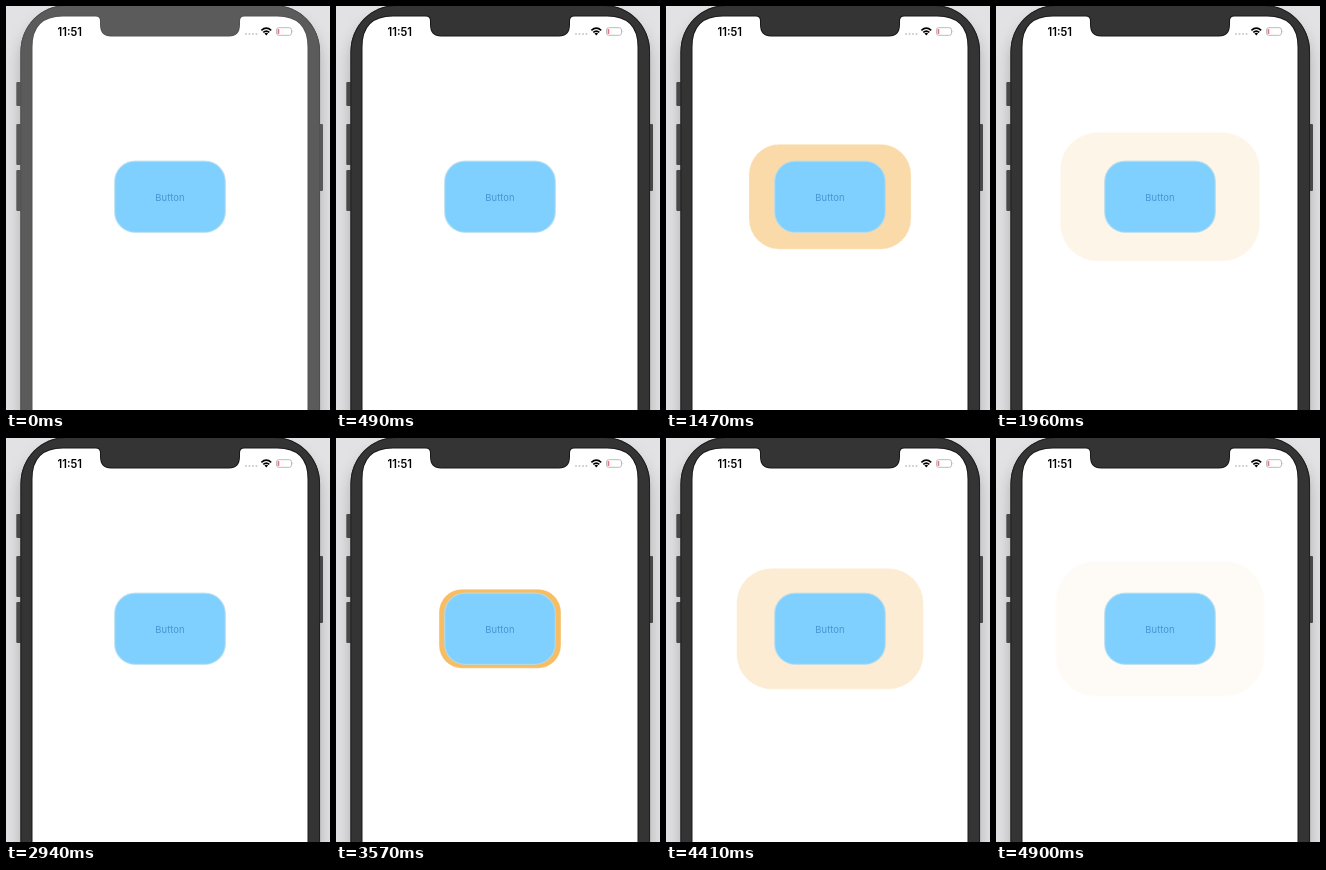
Recreate the animation shown at these times as an HTML page. Size 324 px wide and 404 px high, loop 4970 ms.

```html
<!DOCTYPE html>
<html lang="en">
<head>
<meta charset="utf-8">
<title>Pulsing button</title>
<style>
  html, body { margin: 0; width: 100%; height: 100%; overflow: hidden; background: #e2e2e5; }
  svg { display: block; width: 324px; height: 404px; }
  text { font-family: Inter, Roboto, sans-serif; }
  .time { font-size: 11.1px; font-weight: 600; }
  .label { font-size: 9.4px; letter-spacing: .1px; fill: #4396d3; text-anchor: middle; }
  .shadow { filter: drop-shadow(0 12px 8px rgba(0, 0, 0, .23)); }
</style>
</head>
<body>
<svg viewBox="0 0 324 404">
  <rect class="shadow" x="14.500" y="-1" width="299.500" height="460" rx="46" fill="#333"/>
  <g id="keys">
    <rect x="10.300" y="76" width="6" height="24" rx="1"/>
    <rect x="10.300" y="118" width="6" height="41" rx="1"/>
    <rect x="10.300" y="164" width="6" height="41" rx="1"/>
    <rect x="312" y="118" width="5" height="67" rx="1"/>
  </g>
  <rect id="bezel" x="14.900" y="-.6" width="298.700" height="460" rx="46" stroke-width=".8"/>

  <path id="screen" fill="#fff" stroke-width="2" paint-order="stroke"
    d="M26.500 420V41Q26.500 10.600 57 10.600H89.500Q94 10.600 94 15V18.500Q94 30.500 105 30.500H223
    Q234 30.500 234 18.500V15Q234 10.600 238.500 10.600H271Q301.500 10.600 301.500 41V420Z"/>

  <text class="time" x="51.600" y="29.700">11:51</text>
  <g fill="#c8c8c8">
    <circle cx="240" cy="28" r="1"/>
    <circle cx="243.500" cy="28" r="1"/>
    <circle cx="247" cy="28" r="1"/>
    <circle cx="250.500" cy="28" r="1"/>
  </g>
  <g fill="none" stroke="#000" stroke-width="1.600">
    <path d="M255.400 24.300Q260.300 19.900 265.200 24.300M257.300 26.400Q260.300 23.700 263.300 26.400"/>
    <path d="M258.500 27.500Q260.300 26 262.100 27.500L260.300 29.500Z" fill="#000" stroke="none"/>
  </g>
  <rect x="270.500" y="21.700" width="15" height="7.600" rx="2.200" fill="none" stroke="#b5b5b5" stroke-width=".9"/>
  <rect x="271.600" y="22.900" width="1.700" height="5.200" rx=".6" fill="#f4707c"/>
  <path d="M286.700 24.200Q288 25.500 286.700 26.800Z" fill="#b5b5b5"/>

  <rect id="pulse" x="-56" y="-36.250" width="112" height="72.500" rx="21" fill="#f7b653"
    stroke="#fff" stroke-opacity=".4" stroke-width=".6"/>
  <rect x="108.700" y="155.200" width="110.600" height="71.100" rx="20.300" fill="#80d0ff"
    stroke="#b9dcea" stroke-opacity=".75" stroke-width="1.300"/>
  <text class="label" x="164" y="194.800">Button</text>
</svg>

<script>
  const LOOP = 4970, STEP = 70;
  const GROWTH = 0.895, PULSE_MS = 1940, MAX_PROGRESS = 0.962;
  const pulses = [{ start: 500, end: 2100 }, { start: 3145, end: LOOP }];
  const [pulse, bezel, screen, keys] = ['pulse', 'bezel', 'screen', 'keys']
    .map(id => document.getElementById(id));

  // cubic-bezier(.42, 0, .58, 1)
  function easeInOut(u) {
    let low = 0, high = 1;
    for (let i = 0; i < 20; i++) {
      const s = (low + high) / 2, r = 1 - s;
      const x = 1.26 * r * r * s + 1.74 * r * s * s + s * s * s;
      if (x < u) low = s; else high = s;
    }
    return low * low * (3 - 2 * low);
  }

  function gray(from, to, k) {
    const v = Math.round(from + (to - from) * k);
    return `rgb(${v},${v},${v})`;
  }

  function draw(t) {
    const focus = Math.min(t / 280, 1);
    const rim = gray(82, 24, focus);
    bezel.setAttribute('fill', gray(91, 52, focus));
    bezel.setAttribute('stroke', rim);
    screen.setAttribute('stroke', rim);
    keys.setAttribute('fill', gray(88, 72, focus));

    const active = pulses.find(p => t >= p.start && t < p.end);
    pulse.setAttribute('visibility', active ? 'visible' : 'hidden');
    if (!active) return;
    const u = Math.min((t - active.start) / PULSE_MS, 1);
    const progress = Math.min(easeInOut(u), MAX_PROGRESS);
    pulse.setAttribute('transform', `translate(164 190.75) scale(${1 + GROWTH * progress})`);
    pulse.setAttribute('opacity', 1 - progress);
  }

  const began = performance.now();
  function tick() {
    const t = (performance.now() - began) % LOOP;
    draw(Math.floor(t / STEP) * STEP);
    requestAnimationFrame(tick);
  }
  tick();
</script>
</body>
</html>
```
